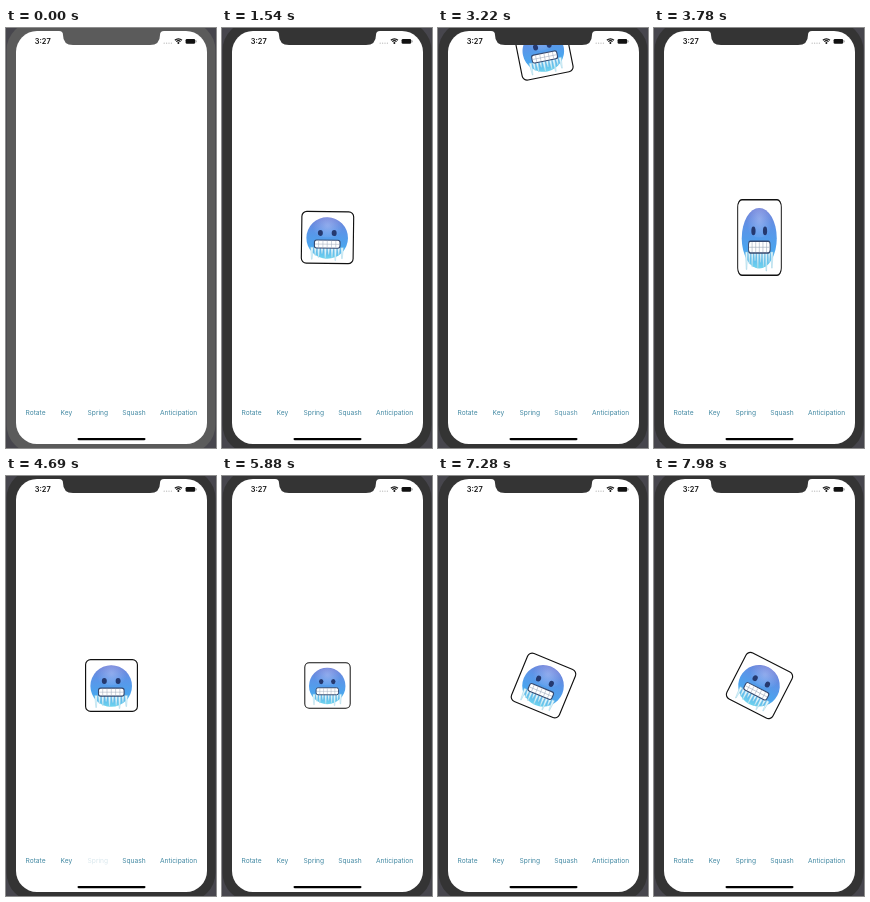
Write an HTML page with a canvas that moves like this. It is 210 px wide and 420 px high and loops after 8 s.

```html
<!DOCTYPE html>
<html lang="en">
<head>
<meta charset="utf-8">
<title>Animation buttons</title>
<style>
html, body { margin: 0; width: 100%; height: 100%; overflow: hidden; background: #333; }
canvas { display: block; width: 210px; height: 420px; }
</style>
</head>
<body>
<canvas id="stage"></canvas>
<script>
const W = 210, H = 420, LOOP = 8000;
const HOME = { x: 105.5, y: 209.5 };
const DEG = Math.PI / 180;
const canvas = document.getElementById('stage');
const ctx = canvas.getContext('2d');
const dpr = window.devicePixelRatio || 1;
canvas.width = W * dpr;
canvas.height = H * dpr;

// label, left edge, touch down, touch up
const buttons = [
  ['Rotate', 19.5],
  ['Key', 54.6, 6110, 6240],
  ['Spring', 81.6, 4620, 4780],
  ['Squash', 116.2, 2800, 2870],
  ['Anticipation', 154, 980, 1110]
];

const clamp = v => Math.max(0, Math.min(1, v));

// cubic-bezier(.42, 0, .58, 1)
function ease(u) {
  u = clamp(u);
  let lo = 0, hi = 1;
  for (let i = 0; i < 24; i++) {
    const s = (lo + hi) / 2, r = 1 - s;
    if (1.26 * s * r * r + 1.74 * s * s * r + s * s * s < u) lo = s; else hi = s;
  }
  return lo * lo * (3 - 2 * lo);
}

// linear interpolation through [position, value] keys
function track(p, ...keys) {
  if (p <= keys[0][0]) return keys[0][1];
  for (let i = 1; i < keys.length; i++) {
    const [a, va] = keys[i - 1], [b, vb] = keys[i];
    if (p <= b) return va + (vb - va) * (p - a) / (b - a);
  }
  return keys[keys.length - 1][1];
}

function anticipation(ms) {
  const p = ease(ms / 1500);
  return {
    x: track(p, [0.2, HOME.x], [1, 254.5]),
    angle: track(p, [0, 0], [0.1, 11.25], [0.22, -11.25])
  };
}

function squash(ms) {
  const p = ease(ms / 1720);
  return {
    y: track(p, [0, -30], [0.4, HOME.y]),
    angle: track(p, [0.2, -11.25], [0.4, 0]),
    sx: track(p, [0.2, 1], [0.4, 1.7], [0.6, 0.6], [0.7, 1.11], [1, 1]),
    sy: track(p, [0.2, 1], [0.4, 0.6], [0.6, 1.7], [0.7, 0.9], [1, 1])
  };
}

function spring(ms) {
  const t = ms / 1000, w = 2 * Math.PI / 1.1, k = 1.9;
  const s = 1 - Math.exp(-k * t) * (Math.cos(w * t) + k / w * Math.sin(w * t));
  return { sx: s, sy: s };
}

function key(ms) {
  const p = ease(ms / 4250);
  return { angle: track(p, [0, 0], [0.25, 45], [0.5, 0]) };
}

function pose(t) {
  if (t < 1130) return null;
  if (t < 2865) return anticipation(t - 1130);
  if (t < 4780) return squash(t - 2865);
  if (t < 6237) return spring(t - 4780);
  return key(t - 6237);
}

function box(x, y, w, h, r) {
  ctx.beginPath();
  ctx.roundRect(x, y, w, h, r);
}

function disc(x, y, rx, ry = rx) {
  ctx.beginPath();
  ctx.ellipse(x, y, rx, ry, 0, 0, 7);
}

function drawFace() {
  let g = ctx.createLinearGradient(0, -21, 0, 22);
  g.addColorStop(0, '#7480d6');
  g.addColorStop(0.35, '#5b95e8');
  g.addColorStop(0.68, '#4ba4ee');
  g.addColorStop(1, '#72d8ee');
  ctx.fillStyle = g;
  disc(-0.3, 0.5, 20.8);
  ctx.fill();
  g = ctx.createRadialGradient(0, -12, 1, 0, -11, 15);
  g.addColorStop(0, 'rgba(190,205,250,.45)');
  g.addColorStop(1, 'rgba(190,205,250,0)');
  ctx.fillStyle = g;
  disc(-0.3, -10, 15, 10);
  ctx.fill();

  ctx.fillStyle = '#25396f';
  for (const x of [-7.2, 6.6]) {
    disc(x, -4.5, 2.5, 3);
    ctx.fill();
  }

  // icicles
  ctx.fillStyle = '#e2f6fc';
  ctx.strokeStyle = '#8fcbe0';
  ctx.lineWidth = 0.4;
  [11, 7, 9, 5, 10, 6, 9, 12, 6, 10].forEach((len, i) => {
    const x = -15.4 + i * 3.35;
    ctx.beginPath();
    ctx.moveTo(x - 1.3, 10);
    ctx.lineTo(x + 1.3, 10);
    ctx.lineTo(x + 0.3, 11 + len);
    ctx.lineTo(x - 0.3, 11 + len);
    ctx.closePath();
    ctx.fill();
    ctx.stroke();
  });

  // teeth
  box(-13, 2.6, 25.6, 8, 2.2);
  ctx.fillStyle = '#fff';
  ctx.fill();
  ctx.strokeStyle = '#34486f';
  ctx.lineWidth = 1.1;
  ctx.stroke();
  ctx.strokeStyle = '#9aa6b8';
  ctx.lineWidth = 0.5;
  ctx.beginPath();
  ctx.moveTo(-12.4, 6.7);
  ctx.lineTo(12, 6.7);
  for (let x = -8.8; x < 12; x += 4.3) {
    ctx.moveTo(x, 3.2);
    ctx.lineTo(x, 10);
  }
  ctx.stroke();
}

function drawCard({ x = HOME.x, y = HOME.y, angle = 0, sx = 1, sy = 1 }) {
  ctx.save();
  ctx.translate(x, y);
  ctx.rotate(angle * DEG);
  ctx.scale(Math.max(sx, 0.0001), Math.max(sy, 0.0001));
  box(-25.9, -25.9, 51.8, 51.8, 5);
  ctx.fillStyle = '#fff';
  ctx.fill();
  drawFace();
  box(-25.9, -25.9, 51.8, 51.8, 5);
  ctx.strokeStyle = '#111';
  ctx.lineWidth = 1.15;
  ctx.stroke();
  ctx.restore();
}

function drawNotch(color) {
  ctx.fillStyle = color;
  ctx.beginPath();
  ctx.moveTo(53, 2);
  ctx.lineTo(53, 3);
  ctx.quadraticCurveTo(57, 3, 57, 7);
  ctx.quadraticCurveTo(57, 17, 67, 17);
  ctx.lineTo(144, 17);
  ctx.quadraticCurveTo(154, 17, 154, 7);
  ctx.quadraticCurveTo(154, 3, 158, 3);
  ctx.lineTo(158, 2);
  ctx.fill();
}

function drawStatus() {
  ctx.fillStyle = '#111';
  ctx.font = '600 7.4px Inter, Roboto, sans-serif';
  ctx.fillText('3:27', 28.8, 16);
  ctx.fillStyle = '#bbb';
  for (let i = 0; i < 4; i++) {
    disc(158.2 + i * 2.4, 15.2, 0.65);
    ctx.fill();
  }
  ctx.strokeStyle = '#111';
  ctx.lineWidth = 1.2;
  for (const r of [5, 3]) {
    ctx.beginPath();
    ctx.arc(172.4, 15.8, r, -2.35, -0.79);
    ctx.stroke();
  }
  ctx.fillStyle = '#111';
  disc(172.4, 15, 1);
  ctx.fill();
  box(179.6, 10.9, 9.6, 4.9, 1.4);
  ctx.fill();
  ctx.fillStyle = '#777';
  ctx.fillRect(189.7, 12.5, 0.8, 1.8);
}

function drawButtons(t) {
  ctx.font = '400 6.65px Inter, Roboto, sans-serif';
  ctx.fillStyle = '#4389a3';
  for (const [text, x, down, up] of buttons) {
    ctx.globalAlpha = t < down ? 1 : t < up ? 0.2 : up ? 0.2 + 0.8 * ease((t - up) / 470) : 1;
    ctx.fillText(text, x, 386.5);
  }
  ctx.globalAlpha = 1;
}

function draw(t) {
  const bezel = t < 980 ? '#5b5b5b' : '#343434';
  ctx.setTransform(dpr, 0, 0, dpr, 0, 0);
  ctx.fillStyle = '#47464d';
  ctx.fillRect(0, 0, W, H);
  ctx.fillStyle = bezel;
  box(0.6, -6, 208.8, 431, 28);
  ctx.fill();

  ctx.save();
  box(10, 3, 191, 413, 21);
  ctx.fillStyle = '#fff';
  ctx.fill();
  ctx.clip();
  drawButtons(t);
  const p = pose(t);
  if (p) drawCard(p);
  drawStatus();
  ctx.fillStyle = '#000';
  box(71.5, 410, 68, 2.2, 1.1);
  ctx.fill();
  ctx.restore();
  drawNotch(bezel);
}

function frame() {
  draw(performance.now() % LOOP);
  requestAnimationFrame(frame);
}
frame();
</script>
</body>
</html>
```
